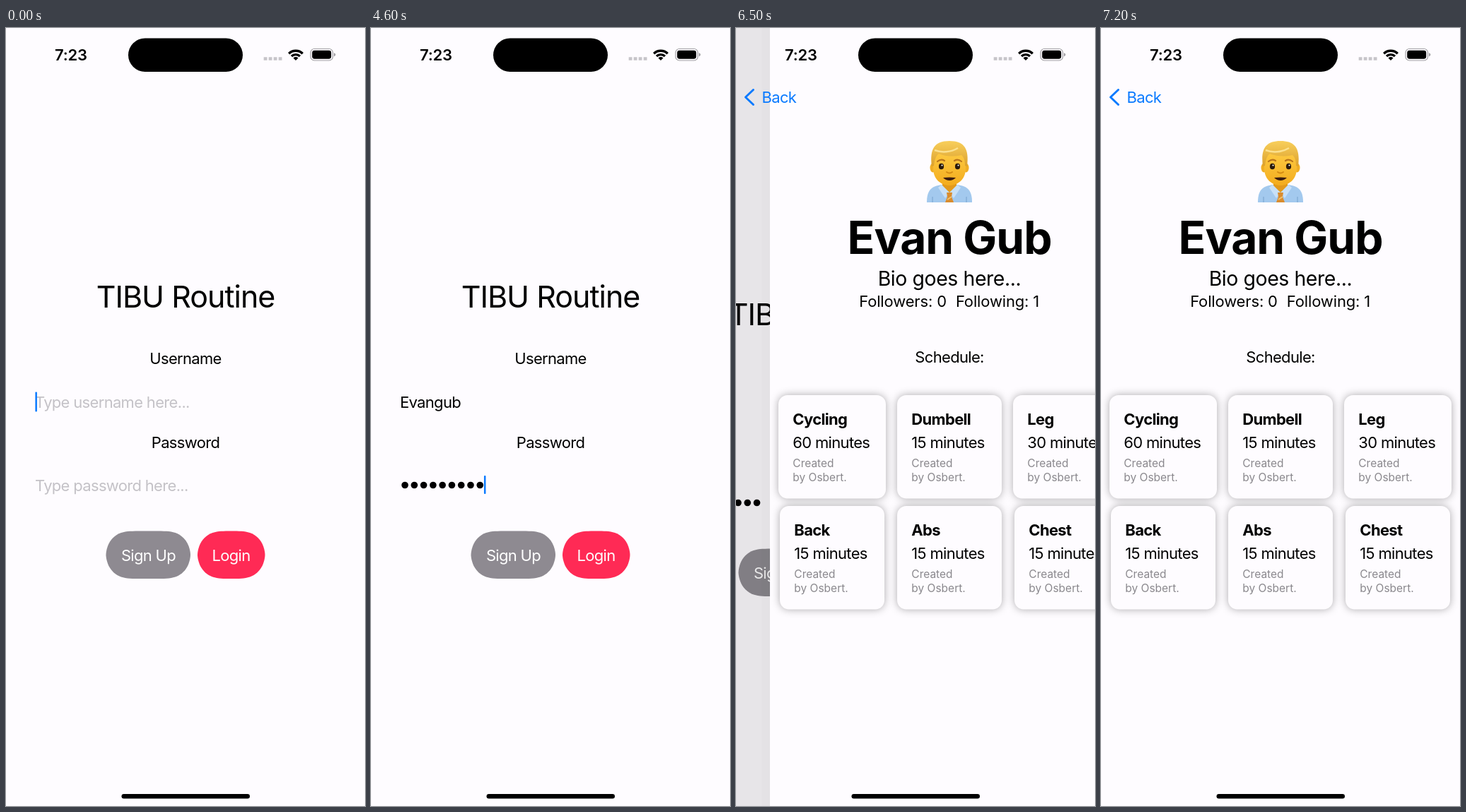
An HTML page that plays this animation: 508 by 1102 pixels, repeating every 7300 ms.

```html
<!DOCTYPE html>
<html lang="en">
<head>
<meta charset="utf-8">
<title>Workout login</title>
<style>
  html, body { margin: 0; width: 100%; height: 100%; overflow: hidden; background: #fefcff; }
  svg { display: block; width: 508px; height: 1102px; }
  text { font: 22px Inter, "Open Sans", sans-serif; letter-spacing: -.68px; white-space: pre; font-optical-sizing: none; }
  .mid { text-anchor: middle; }
  .title { font-size: 43px; letter-spacing: -1px; }
  .name { font-size: 64px; font-weight: 700; letter-spacing: -1px; }
  .bio { font-size: 28.4px; letter-spacing: -.4px; }
  .count { letter-spacing: -.15px; }
  .clock { font-weight: 600; letter-spacing: -.2px; }
  .hint { fill: #c4c2c7; }
  .head { font-weight: 700; }
  .note { font-size: 15.5px; letter-spacing: 0; fill: #8a888d; }
  .label { fill: #fff; }
  .page { fill: #fefcff; }
  .card { fill: #fefcff; filter: drop-shadow(0 0 6px rgba(0, 0, 0, .33)); }
</style>
</head>
<body>
<svg viewBox="0 0 508 1102">
  <rect class="page" width="508" height="1102"/>

  <g id="login">
    <text class="mid title" x="254" y="396">TIBU Routine</text>
    <text class="mid" x="254" y="476">Username</text>
    <text class="hint" id="userHint" x="41" y="538">Type username here...</text>
    <text id="user" x="41" y="538"></text>
    <text class="mid" x="254" y="594.5">Password</text>
    <text class="hint" id="passHint" x="41" y="656">Type password here...</text>
    <g id="dots"></g>
    <rect id="caret" width="2.5" rx="1" fill="#0a7aff"/>
    <path id="signUpShape" fill="#8e8a91"/>
    <text class="mid label" x="201.5" y="755">Sign Up</text>
    <path id="loginShape" fill="#ff2a55"/>
    <text class="mid label" id="loginLabel" x="318.5" y="755">Login</text>
  </g>
  <rect id="shade" width="508" height="1102"/>

  <g id="profile">
    <rect x="-12" width="14" height="1102" opacity=".01"/>
    <rect class="page" width="508" height="1102"/>
    <g id="avatar">
      <path d="M222 247C222 229 229 224 243 222H265C279 224 286 229 286 247Z" fill="#a3c9ee"/>
      <path d="M230 247V239M278 247V239" stroke="#7fa9d3" stroke-width="1.2"/>
      <path d="M244 214H264V225L254 234L244 225Z" fill="#e39a1c"/>
      <path d="M243 222L254 233L248 241L238 226ZM265 222L254 233L260 241L270 226Z" fill="#c7e0f8"/>
      <path d="M250 233H258L257 239L260 247H248L251 239Z" fill="#d98c2e"/>
      <path d="M251 243L257 239" stroke="#f2c26b" stroke-width="2"/>
      <ellipse cx="230.5" cy="198" rx="4" ry="6.5" fill="#f0ae24"/>
      <ellipse cx="277.5" cy="198" rx="4" ry="6.5" fill="#f0ae24"/>
      <path d="M231 184C231 170 241 166 254 166C267 166 277 170 277 184V199C277 214 266 223 254 223C242 223 231 214 231 199Z" fill="url(#skin)"/>
      <path d="M229 196C226 172 232 160 254 160C276 160 282 172 279 196L276 195C276 188 275 184 271 180C258 183 245 181 239 178C234 182 233 188 232 195Z" fill="url(#hair)"/>
      <path d="M233 173C243 177 256 176 266 170" fill="none" stroke="#ffeaa0" stroke-width="2.5" opacity=".8"/>
      <path d="M237 189Q242 185 247 188M261 188Q266 185 271 189" fill="none" stroke="#b8741c" stroke-width="2.2" stroke-linecap="round"/>
      <ellipse cx="242.5" cy="196" rx="3.6" ry="4.3" fill="#2a1a0c"/>
      <ellipse cx="265.5" cy="196" rx="3.6" ry="4.3" fill="#2a1a0c"/>
      <circle cx="243.5" cy="194.5" r="1.1" fill="#fff"/>
      <circle cx="266.5" cy="194.5" r="1.1" fill="#fff"/>
      <path d="M250 204Q254 207 258 204" fill="none" stroke="#d48a12" stroke-width="2" stroke-linecap="round"/>
      <path d="M245 212Q254 211 263 212Q259 216 254 216Q249 216 245 212Z" fill="#3b1d10"/>
    </g>
    <text class="mid name" x="254" y="320">Evan Gub</text>
    <text class="mid bio" x="254" y="365">Bio goes here...</text>
    <text class="mid count" x="188" y="395">Followers: 0</text>
    <text class="mid count" x="322" y="395">Following: 1</text>
    <text class="mid" x="254" y="474">Schedule:</text>
    <g id="cards"></g>
  </g>

  <g id="back" fill="#0a7aff">
    <path d="M24.5 87.5L13.5 98L24.5 108.5" fill="none" stroke="#0a7aff" stroke-width="3" stroke-linecap="round" stroke-linejoin="round"/>
    <text x="36.5" y="106">Back</text>
  </g>

  <g id="system">
    <text class="mid clock" x="92" y="46">7:23</text>
    <rect x="173" y="14.5" width="162" height="47.5" rx="23.75"/>
    <path d="M364.7 43.5h26" stroke="#c6c4c9" stroke-width="4.6" stroke-dasharray="4.8 2.2"/>
    <g fill="none" stroke="#000" stroke-width="3.4">
      <path d="M400.2 36.2A14.2 14.2 0 0 1 419.8 36.2"/>
      <path d="M404 40A8.7 8.7 0 0 1 416 40"/>
    </g>
    <path d="M410 46L406.5 42.5A5 5 0 0 1 413.5 42.5Z"/>
    <rect x="431" y="29.5" width="31.5" height="16.5" rx="5.3" fill="none" stroke="#a19fa4" stroke-width="1.2"/>
    <rect x="433.2" y="31.7" width="27" height="12" rx="3.4"/>
    <path d="M464 35.2Q466.4 36 466.4 37.8T464 40.4Z" fill="#a19fa4"/>
    <rect x="163.5" y="1085" width="181.5" height="6.5" rx="3.25"/>
  </g>

  <defs>
    <linearGradient id="skin" x2="0" y2="1">
      <stop stop-color="#ffd04a"/><stop offset="1" stop-color="#f3ac1e"/>
    </linearGradient>
    <linearGradient id="hair" x2="0" y2="1">
      <stop stop-color="#f8cf5c"/><stop offset="1" stop-color="#dba02c"/>
    </linearGradient>
  </defs>
</svg>

<script>
const $ = id => document.getElementById(id);
const LOOP = 7300, STEP = 100, WIDTH = 508, LEFT = 41;
const USERNAME = "Evangub";
const USER_KEYS = [800, 1000, 1100, 1400, 1900, 2000, 2100];
const PASS_KEYS = [3700, 3700, 3900, 4000, 4100, 4200, 4300, 4500, 4600, 5100];
const DOT = 13.28;
const PUSH = 6280, PUSH_RATE = 0.018;

// Caret opacity: [from time, value]
const BLINK = [
  [0, 1], [300, .65], [400, .25], [500, 0], [700, .6], [800, 1],
  [2600, 0], [3100, .6], [3200, 1], [5600, .4], [5700, 0]
];
const FOCUS_PASS = 3200;

// Capsule whose corners run smoothly into the long sides
function pill(x, y, w, h) {
  const r = h / 2, reach = Math.min(1.528, w / h);
  const corner = [
    [reach, 0], [1.088, 0], [.868, 0], [.631, .075], [.373, .169],
    [.169, .373], [.075, .631], [.047, .709], [0, .86], [0, 1]
  ];
  const curve = (right, bottom) => {
    const points = corner.map(([u, v]) =>
      `${right ? x + w - u * r : x + u * r} ${bottom ? y + h - v * r : y + v * r}`);
    if (right !== bottom) points.reverse();
    return points[0] + "C" + points.slice(1).join(" ");
  };
  return `M${curve(false, false)}L${curve(false, true)}L${curve(true, true)}L${curve(true, false)}Z`;
}
$("signUpShape").setAttribute("d", pill(141.5, 712.5, 119.5, 67.5));
$("loginShape").setAttribute("d", pill(271, 712.5, 95.5, 67.5));

const cards = [
  ["Cycling", 60, 12, 152], ["Dumbell", 15, 180, 148], ["Leg", 30, 344, 152],
  ["Back", 15, 14, 148], ["Abs", 15, 180, 148], ["Chest", 15, 346, 148]
];
$("cards").innerHTML = cards.map(([name, minutes, x, w], i) => `
  <g transform="translate(${x} ${i < 3 ? 520 : 677})">
    <rect class="card" width="${w}" height="146.5" rx="13"/>
    <text class="head" x="20.3" y="42">${name}</text>
    <text x="20.3" y="75">${minutes} minutes</text>
    <text class="note" x="20.3" y="101.5">Created</text>
    <text class="note" x="20.3" y="122">by Osbert.</text>
  </g>`).join("");

$("dots").innerHTML = PASS_KEYS.map((_, i) =>
  `<circle cx="${48 + i * DOT}" cy="647.5" r="4.8"/>`).join("");
const dots = [...$("dots").children];

const typed = (keys, t) => keys.filter(k => k <= t).length;
const show = (el, on) => el.setAttribute("visibility", on ? "visible" : "hidden");
const move = (el, x, y) => el.setAttribute("transform", `translate(${x} ${y})`);

// Critically damped spring from 0 to 1
function spring(ms) {
  const a = Math.max(0, ms) * PUSH_RATE;
  return 1 - (1 + a) * Math.exp(-a);
}

function drawFields(t) {
  const chars = typed(USER_KEYS, t), count = typed(PASS_KEYS, t);
  $("user").textContent = USERNAME.slice(0, chars);
  show($("userHint"), !chars);
  show($("passHint"), !count);
  dots.forEach((dot, i) => show(dot, i < count));

  const inPass = t >= FOCUS_PASS;
  const length = inPass ? count * DOT : chars && $("user").getComputedTextLength();
  const caret = $("caret");
  caret.setAttribute("x", LEFT + length + (length ? -.6 : .4));
  caret.setAttribute("y", inPass ? 634 : 515.5);
  caret.setAttribute("height", inPass ? 26 : 28);
  caret.setAttribute("opacity", BLINK.filter(b => b[0] <= t).pop()[1]);
}

function drawPush(t) {
  const p = spring(t - PUSH), pushed = t >= PUSH;
  $("loginLabel").setAttribute("opacity", t >= 6200 ? .27 : 1);
  move($("login"), -.3 * WIDTH * p, pushed ? 25 : 0);
  $("shade").setAttribute("opacity", .1 * p);
  move($("profile"), WIDTH * (1 - p), 0);
  show($("profile"), pushed);
  show($("back"), pushed);
}

let start;
function frame(now) {
  start ??= now;
  // The screen refreshes ten times a second
  const t = Math.floor((now - start) % LOOP / STEP) * STEP;
  drawFields(t);
  drawPush(t);
  requestAnimationFrame(frame);
}
requestAnimationFrame(frame);
</script>
</body>
</html>
```
